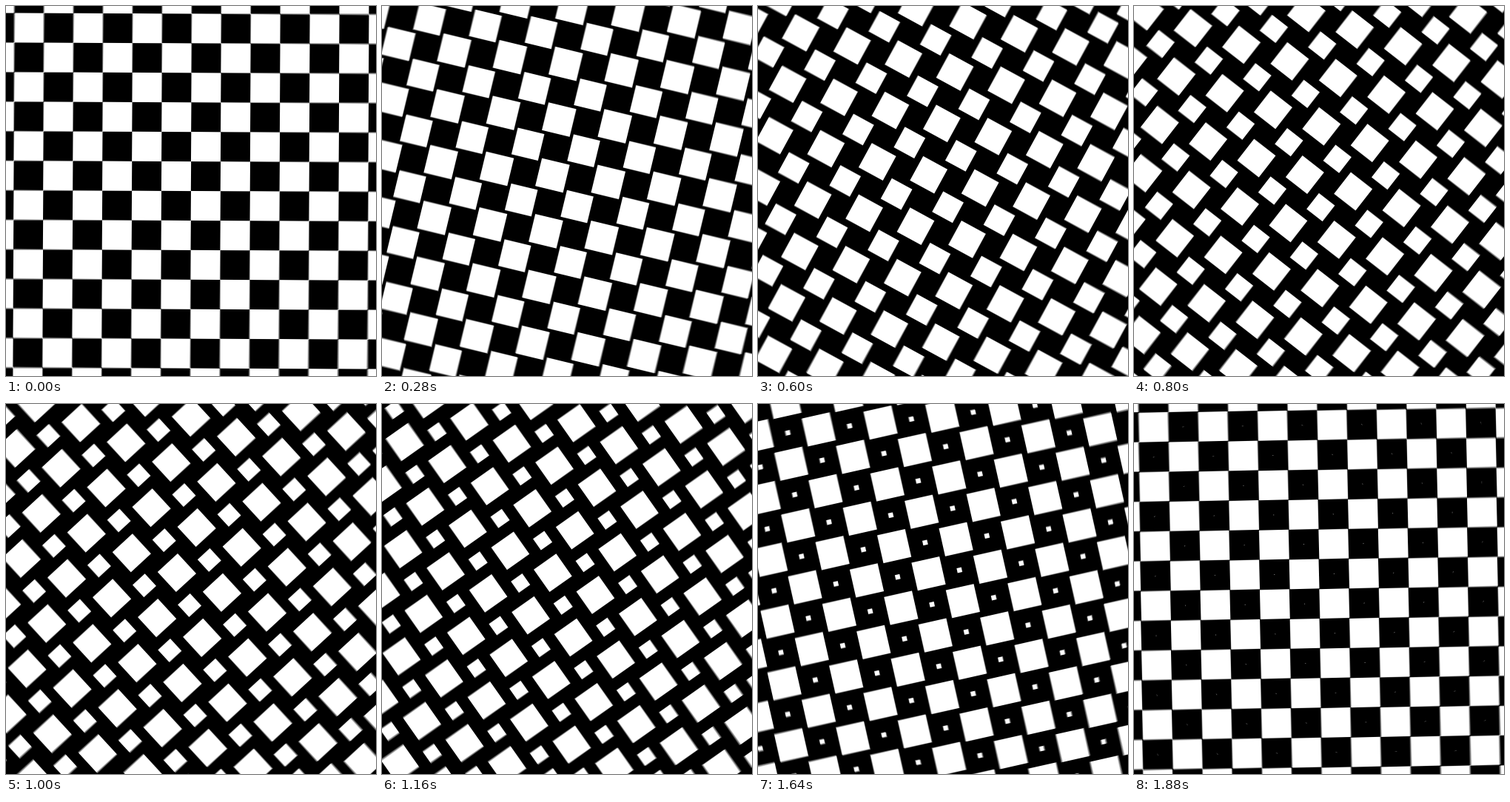
These frames come from a looping animation (500x500 px, 1920 ms). An HTML page with a canvas:

```html
<!DOCTYPE html>
<html lang="en">
<head>
<meta charset="utf-8">
<title>Twisting checkerboard</title>
<style>
  html, body { margin: 0; width: 100%; height: 100%; overflow: hidden; background: #000; }
  canvas { display: block; width: 500px; height: 500px; }
</style>
</head>
<body>
<canvas id="stage" width="500" height="500"></canvas>
<script>
const ctx = document.getElementById('stage').getContext('2d');
const LOOP = 1920, STEP = 40, STEPS = LOOP / STEP;
const SAMPLES = 5, SHUTTER = 0.6;
const CELL = 40, REACH = 8;

function addSquare(x, y, side, angle) {
  const c = Math.cos(angle), s = Math.sin(angle);
  ctx.setTransform(c, s, -s, c, x, y);
  ctx.rect(-side / 2, -side / 2, side, side);
}

// p runs from 0 to 1 over one loop
function drawPattern(p) {
  const zoom = Math.pow(2, -p / 2);
  const turn = p * Math.PI / 4;
  const ux = zoom * Math.cos(turn), uy = zoom * Math.sin(turn);
  const cx = 250 - CELL / 2 * p, cy = 250;
  const big = CELL - 3.1 * Math.sin(Math.PI * p);
  const small = CELL * zoom * Math.cos(Math.PI / 2 * p);

  // The lattice spirals inwards while each square turns twice as fast
  const place = (gx, gy, side) => {
    const x = (gx - 0.5) * CELL, y = (gy - 0.5) * CELL;
    addSquare(cx + x * ux - y * uy, cy + x * uy + y * ux, side, 2 * turn);
  };

  ctx.beginPath();
  for (let i = -REACH; i <= REACH; i++) {
    for (let j = -REACH; j <= REACH; j++) {
      place(2 * i, 2 * j, big);
      place(2 * i + 1, 2 * j + 1, small);
    }
  }
  ctx.fill();
}

function draw(step) {
  ctx.setTransform(1, 0, 0, 1, 0, 0);
  ctx.globalCompositeOperation = 'source-over';
  ctx.fillStyle = '#000';
  ctx.fillRect(0, 0, 500, 500);

  // Motion blur: five equal exposures add up to white
  ctx.globalCompositeOperation = 'lighter';
  ctx.fillStyle = '#333';
  for (let k = 0; k < SAMPLES; k++) {
    drawPattern((step + k * SHUTTER / SAMPLES) / STEPS);
  }
}

let shown = -1;
function tick() {
  const step = Math.floor(performance.now() % LOOP / STEP);
  if (step !== shown) draw(shown = step);
  requestAnimationFrame(tick);
}
tick();
</script>
</body>
</html>
```
